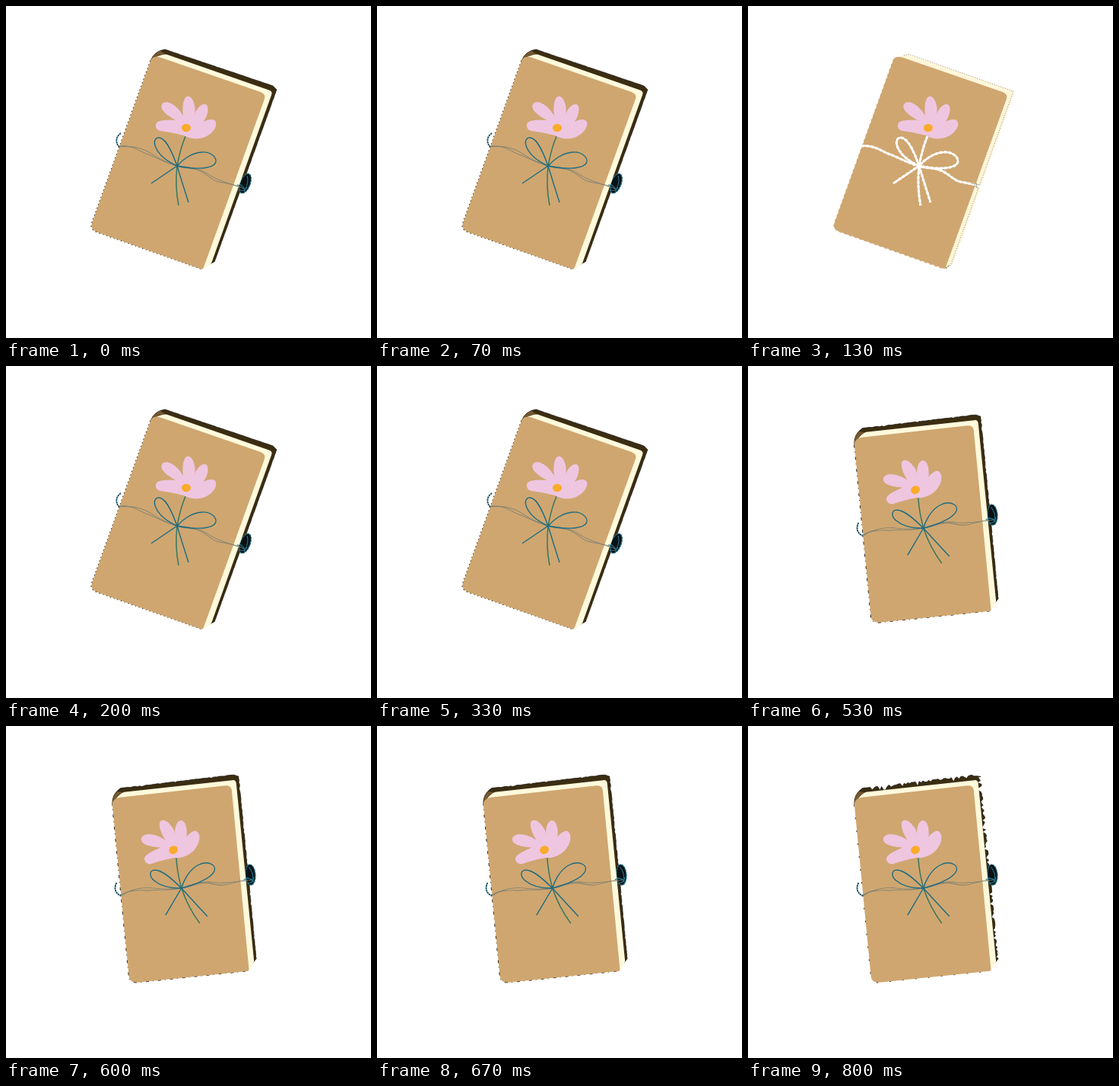
Animation, 480 px wide and 436 px high, one loop 1070 ms. Source, as an HTML page with a canvas:

```html
<!DOCTYPE html>
<html lang="en">
<head>
<meta charset="utf-8">
<title>Notebook</title>
<style>
html, body { margin: 0; width: 100%; height: 100%; overflow: hidden; background: #fff; }
canvas { display: block; width: 480px; height: 436px; }
</style>
</head>
<body>
<canvas id="stage" width="480" height="436"></canvas>
<script>
const ctx = document.getElementById('stage').getContext('2d');
const LOOP = 1070;
const TILT = -25.4 * Math.PI / 180;
const TEAL = '#1d6c82';

const path = d => new Path2D(d);
const cover = path('M190 72Q193 65 203 67.5L335 113Q342 116 340 122L260 343Q259 347 255 345L120 297Q110 293 113 285Z');
const outerEdge = path('M190 72L113 285Q110 293 120 297L259 346');
const pages = path('M196 68Q204 63 211 63.5L346 110.5Q351 112 349 117L270 338L260 346Z');
const pageEdge = path('M205 65L211 63L349 112L267 339L260 345');
const spine = path('M190 72Q194 62 203 59L209 63Q201 63 196 69Z');
const petals = path('M234 170C222 167 212 165 203 164C196 163 195 154 200 152C206 149 215 150 223 150' +
  'C216 146 208 141 205 135C202 127 210 124 217 128C225 132 229 138 233 144' +
  'C232 136 232 126 236 120C240 116 245 120 247 127C249 133 249 138 248 142' +
  'C250 136 256 128 262 129C268 131 266 143 260 152C266 149 275 147 276 153' +
  'C278 161 267 173 253 174C246 175 239 173 234 170Z');
const stem = path('M236 171Q229 188 225 210C223 228 224 247 227 262');
const bow = path('M225 210C216 206 203 199 197 186C193 177 197 172 202 173C212 175 220 196 225 210' +
  'C231 203 243 193 257 192C272 191 280 202 274 208C266 215 243 214 225 210' +
  'L191 233M225 210Q232 233 240 258');
const cord = path('M149 184C166 182 176 191 187 195C198 199 212 207 225 210C236 214 246 212 256 217C266 222 270 229 280 231C290 233 298 234 306 237');
const cordThin = path('M149 185C165 183 180 186 193 195C205 203 214 206 225 210C240 211 256 214 266 221C276 228 290 232 314 240');
const hook = path('M151 167C145 171 143 179 149 185');

function stroke(shape, color, width, dash = [], shift = 0) {
  ctx.strokeStyle = color;
  ctx.lineWidth = width;
  ctx.setLineDash(dash);
  ctx.lineDashOffset = shift;
  ctx.stroke(shape);
}

function fill(shape, color) {
  ctx.fillStyle = color;
  ctx.fill(shape);
}

function random(seed) {
  return () => (seed = seed * 16807 % 2147483647) / 2147483647;
}

// Back cover; its outer rim can be bitten away at random
function backCover(bite) {
  const rnd = random(77);
  const p = new Path2D('M190 72Q195 59 209 57');
  const rim = (x0, y0, x1, y1) => {
    const len = Math.hypot(x1 - x0, y1 - y0);
    const nx = (y0 - y1) / len, ny = (x1 - x0) / len;
    for (let s = 0; s <= len; s += 2.5) {
      const k = s / len, d = bite * rnd() ** 3;
      p.lineTo(x0 + (x1 - x0) * k + nx * d, y0 + (y1 - y0) * k + ny * d);
    }
  };
  rim(209, 57, 353, 105.5);
  p.lineTo(356, 110);
  rim(356, 110, 273.5, 338);
  p.lineTo(268, 339);
  p.lineTo(300, 180);
  p.closePath();
  fill(p, '#3b2d12');
  stroke(p, '#15100a', 0.7);
  fill(spine, '#75592f');
}

function knot() {
  const p = new Path2D();
  p.ellipse(314.5, 233, 6.5, 13.5, 0.37, 0, 7);
  fill(p, '#0b1114');
  stroke(p, TEAL, 1.4, [3, 0.8]);
  stroke(path('M307 234Q313 236 314 244M306 241Q313 245 317 238M317 223Q320 231 314 242'), '#247f99', 1);
}

function flower() {
  fill(petals, '#efc6e0');
  const eye = new Path2D();
  eye.ellipse(237, 160, 6, 5.3, 0, 0, 7);
  fill(eye, '#f9ab2b');
}

function darkBook(bite, dash, shift) {
  backCover(bite);
  knot();
  fill(pages, '#fff9dc');
  stroke(hook, '#10262e', 1.8, [2, 1.2]);
  stroke(hook, TEAL, 1);
  stroke(outerEdge, '#17120a', 1.6, dash, shift);
  fill(cover, '#cfa670');
  stroke(cord, '#7d8073', 0.9);
  stroke(cordThin, '#7d8073', 0.9);
  stroke(stem, '#37785f', 1.5);
  stroke(bow, TEAL, 1.4);
  stroke(path('M304 235Q311 235 315 241'), TEAL, 1);
  flower();
}

function paleBook() {
  fill(pages, '#fff6da');
  stroke(pageEdge, '#55503f', 0.7, [1, 2]);
  fill(cover, '#cfa670');
  stroke(outerEdge, '#fff', 1.2, [4, 3]);
  for (const shape of [cord, stem, bow]) {
    stroke(shape, '#fff', 2.2);
    stroke(shape, '#fff', 3.2, [4, 2]);
  }
  stroke(path('M294 233L305 235M297 235L303 240M300 232L301 239'), '#8d8b80', 0.7);
  stroke(path('M260 344L264 341'), '#222', 1, [1, 1]);
  flower();
}

function draw(t) {
  ctx.setTransform(1, 0, 0, 1, 0, 0);
  ctx.fillStyle = '#fff';
  ctx.fillRect(0, 0, 480, 436);
  if (t >= 530) {
    ctx.translate(230.7, 213);
    ctx.rotate(TILT);
    ctx.translate(-225, -210);
  }
  if (t >= 130 && t < 200) paleBook();
  else if (t < 530) darkBook(0.3, [1.5, 3.5], 0);
  else if (t < 800) darkBook(1, [4, 5, 1, 6], t < 600 ? 0 : 3);
  else darkBook(6, [2, 15], 0);
}

function tick() {
  draw(performance.now() % LOOP);
  requestAnimationFrame(tick);
}
tick();
</script>
</body>
</html>
```
